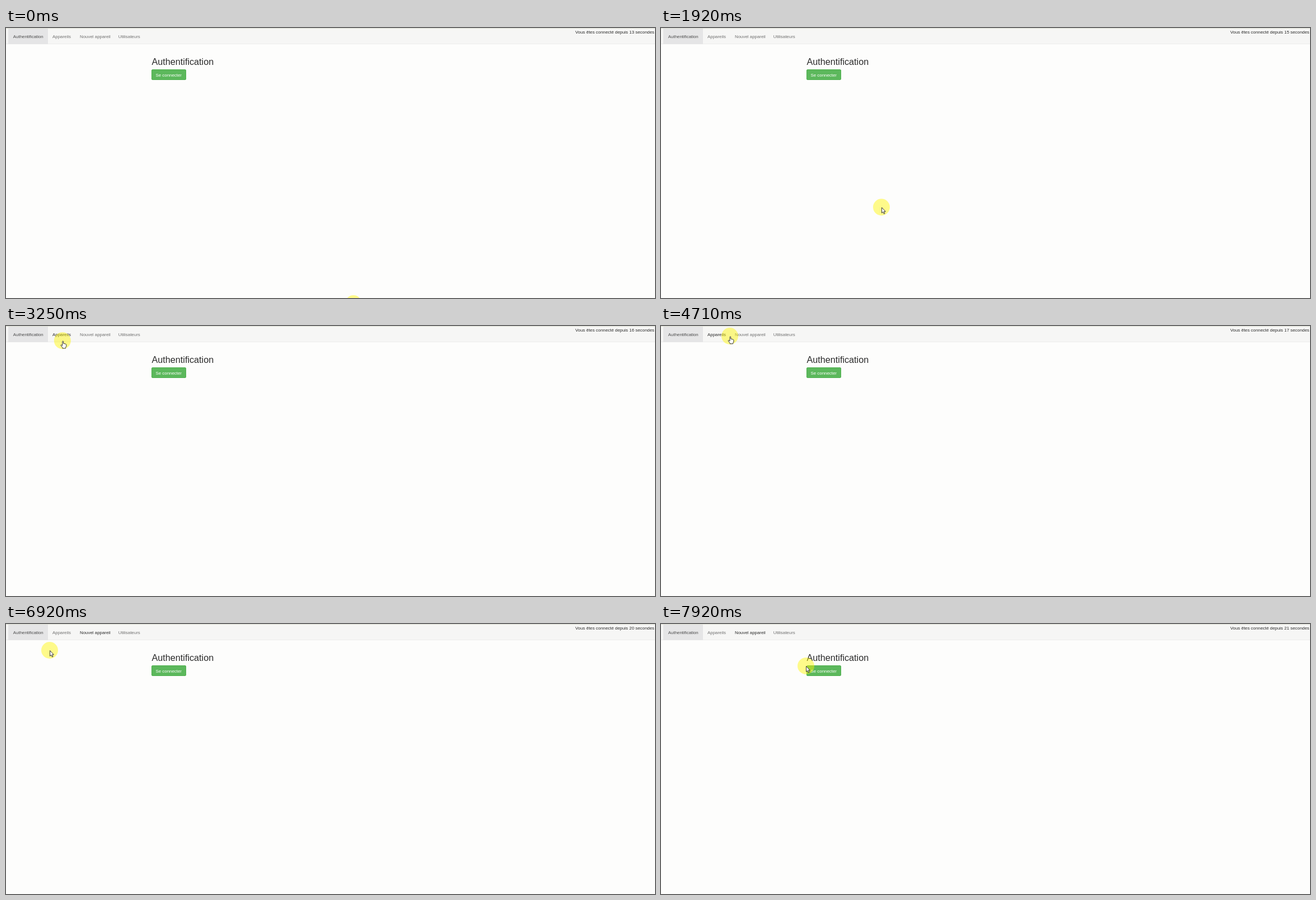
These frames come from a looping animation (1160 px wide and 483 px high, 8000 ms). An HTML page:

```html
<!DOCTYPE html>
<html lang="fr">
<head>
<meta charset="utf-8">
<title>Authentification</title>
<style>
  html, body { margin: 0; width: 100%; height: 100%; overflow: hidden; background: #fdfdfc; }
  svg { display: block; width: 1160px; height: 483px; }
  text { font: 7.9px "Liberation Sans", Arial, sans-serif; fill: #2b2b2b; }
  .link { fill: #707070; }
  .active { fill: #4c4c4c; }
  .link.hover { fill: #2b2b2b; }
  .title { font-size: 16.2px; }
  .label { fill: #fff; }
  .pointer { fill: #fff; stroke: #222; stroke-width: .9; stroke-linejoin: round; }
</style>
</head>
<body>
<svg viewBox="0 0 1160 483">
  <rect width="1160" height="28" fill="#f6f6f5"/>
  <rect width="1160" height="1" fill="#dedfd3"/>
  <rect y="28" width="1160" height="1" fill="#ececec"/>
  <rect x="4" y="1" width="71" height="28" fill="#e5e5e6"/>
  <text class="active" x="12.8" y="18">Authentification</text>
  <text class="link" id="devices" x="83" y="18">Appareils</text>
  <text class="link" id="create" x="132" y="18">Nouvel appareil</text>
  <text class="link" x="200.7" y="18">Utilisateurs</text>
  <text id="timer" x="1017.5" y="9.5"></text>

  <text class="title" x="260.5" y="66">Authentification</text>
  <rect x="260.5" y="74.5" width="61" height="18" rx="1.5" fill="#5cb85c" stroke="#50b050"/>
  <text class="label" x="267.5" y="86.5">Se connecter</text>

  <g id="cursor">
    <circle r="15" fill="#fff600" fill-opacity=".45"/>
    <path class="pointer" id="arrow" d="M.6 .6V10.4L2.8 8.4L4.4 12L6 11.3L4.5 7.8H7.3Z"/>
    <path class="pointer" id="hand" d="M0 9V1.5Q.9 0 1.8 1.5V5L5.6 6Q6.9 6.2 6.9 7.5V10L5.7 12.4V13.8H.2V12.6L-2.9 8.4Q-2.5 6.5 0 9Z"/>
  </g>
</svg>
<script>
  const LOOP = 8000, STEP = 50;
  const $ = id => document.getElementById(id);
  const devices = $('devices'), create = $('create'), timer = $('timer');
  const cursor = $('cursor'), arrow = $('arrow'), hand = $('hand');

  // Pointer moves: start, end, x, y; it rests in between.
  const moves = [
    [130, 920, 287, 72],
    [1040, 1130, 607, 466],
    [1790, 2000, 252, 223.5],
    [2330, 2580, 129, 136],
    [2630, 2920, 98, 37],
    [3080, 3420, 103, 18],
    [4710, 4710, 123, 18],
    [4880, 5170, 151.5, 18],
    [6550, 6920, 78, 47],
    [6970, 7290, 48, 66],
    [7580, 7920, 259, 75]
  ];

  // Each move advances in equal hard steps, the first one at its start.
  function pointerAt(t) {
    let x = 621, y = 493;
    for (const [from, to, x1, y1] of moves) {
      if (t < from) break;
      const count = Math.floor((to - from) / STEP) + 1;
      const k = Math.min(1, (Math.floor((t - from) / STEP) + 1) / count);
      x += (x1 - x) * k;
      y += (y1 - y) * k;
    }
    return [x, y];
  }

  function show(el, on) {
    el.style.display = on ? '' : 'none';
  }

  function draw(t) {
    const [x, y] = pointerAt(t);
    const overNav = y < 29 && x < 248;
    cursor.setAttribute('transform', `translate(${x} ${y})`);
    show(hand, overNav);
    show(arrow, !overNav);
    devices.classList.toggle('hover', t >= 3230 && t < 5330);
    create.classList.toggle('hover', t >= 4930);
    const seconds = 13 + Math.floor((t + 120) / 1000);
    timer.textContent = `Vous êtes connecté depuis ${seconds} secondes`;
  }

  const start = performance.now();
  function tick() {
    draw((performance.now() - start) % LOOP);
    requestAnimationFrame(tick);
  }
  tick();
</script>
</body>
</html>
```
